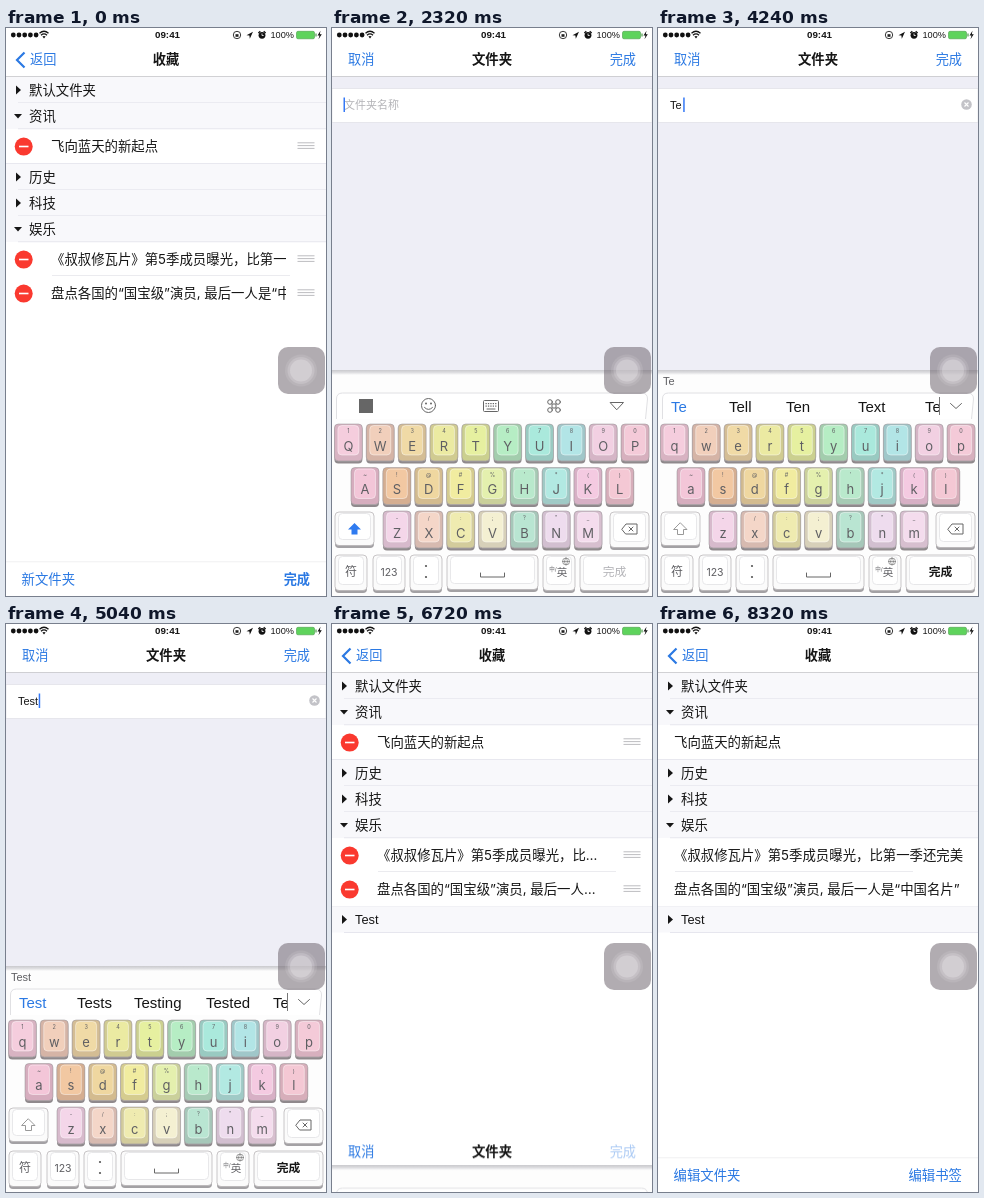
Recreate the animation shown at these times as an HTML page. Size 320x568 px, loop 8.4 s.

```html
<!DOCTYPE html>
<html lang="zh-CN">
<head>
<meta charset="utf-8">
<title>收藏</title>
<style>
html, body { margin: 0; width: 100%; height: 100%; overflow: hidden; background: #fff; }
svg { display: block; width: 320px; height: 568px; overflow: hidden; }
text { font-family: Inter, "Noto Sans CJK SC", "Noto Sans CJK", sans-serif; fill: #161616; white-space: pre; text-spacing-trim: space-all; }
.latin { font-family: "Liberation Sans", "Noto Sans CJK SC", "Noto Sans CJK", sans-serif; }
.mid { text-anchor: middle; }
.end { text-anchor: end; }
.bold { font-weight: 600; }
.blue { fill: #2b79e3; }
.grey { fill: #5f5f63; }
.pale { fill: #b4b4b8; }
.line { fill: none; stroke: #666; stroke-width: 1; stroke-linecap: round; stroke-linejoin: round; }
.modal, .keyboard, .slide, .delete, .grip { animation: 8.4s cubic-bezier(.33, 1, .68, 1) infinite; }
.modal { animation-name: modal; }
.keyboard { animation-name: keyboard; }
.slide { animation-name: slide; }
.delete { animation-name: delete; }
.grip { animation-name: grip; }
@keyframes modal {
  0%, 10.476% { transform: translateY(568px); }
  17.22%, 77.143% { transform: translateY(0); }
  82.857%, 100% { transform: translateY(568px); }
}
@keyframes keyboard {
  0%, 10.476% { transform: translateY(228px); }
  15.238%, 77.143% { transform: translateY(0); }
  82.857%, 100% { transform: translateY(228px); }
}
@keyframes slide {
  0%, 92.381% { transform: translateX(29px); }
  96.19%, 100% { transform: translateX(0); }
}
@keyframes delete {
  0%, 92.381% { transform: translateX(0); opacity: 1; }
  96.19%, 100% { transform: translateX(-29px); opacity: 0; }
}
@keyframes grip {
  0%, 92.381% { opacity: 1; }
  96.19%, 100% { opacity: 0; }
}
</style>
</head>
<body>
<svg id="stage" viewBox="0 0 320 568"></svg>
<script>
const LOOP = 8400;
// Moments of the story, in ms
const QWERTY = 2000, TYPE = 3600, COMMIT = 5600, TAP = 6320, LEAVE_EDIT = 7760;

const text = (x, y, str, size = 13.4, cls = '') =>
  `<text x="${x}" y="${(y + size * .37).toFixed(2)}" font-size="${size}" class="${cls}">${str}</text>`;
const rect = (x, y, w, h, fill, r = 0, more = '') =>
  `<rect x="${x}" y="${y}" width="${w}" height="${h}" rx="${r}" fill="${fill}" ${more}/>`;
const circle = (x, y, r, fill) => `<circle cx="${x}" cy="${y}" r="${r}" fill="${fill}"/>`;
const path = (d, more = 'class="line"') => `<path d="${d}" ${more}/>`;
const during = (from, to, content) => `<g data-show="${from} ${to}">${content}</g>`;

/* Bookmark list */
function folder(y, name, open) {
  const arrow = open ? `M8 ${y - 2}h8l-4 4.5z` : `M10 ${y - 4.5}l5 4.5-5 4.5z`;
  return rect(0, y - 13, 320, 26, '#f8f8fb') + rect(12, y + 12.5, 308, .7, '#dfdfe8') +
    path(arrow, 'fill="#161616"') + text(23, y, name, name === 'Test' ? 12.8 : 13.4, name === 'Test' ? 'latin' : '');
}

function item(y, full, short) {
  const moving = str => `<g class="slide">${text(16, y, str)}</g>`;
  const label = short
    ? during(0, 80, `<g clip-path="url(#narrow)">${moving(full)}</g>`) +
      during(80, LEAVE_EDIT, moving(short)) +
      during(LEAVE_EDIT, LOOP, `<g clip-path="url(#wide)">${moving(full)}</g>`)
    : moving(full);
  const bars = [-2.8, 0, 2.8].map(d => rect(291.5, y + d - .9, 17, 1, '#bdbdc0')).join('');
  return label +
    `<g class="delete">${circle(17.7, y + .6, 9, '#fa392f')}${rect(13, y - .3, 9.5, 1.6, '#fff')}</g>` +
    `<g class="grip">${bars}</g>`;
}

const list = rect(0, 0, 320, 568, '#fff') +
  path('M18.5 24.5l-7.5 7.5 7.5 7.5', 'fill="none" stroke="#2b79e3" stroke-width="2.2"') +
  text(24, 31.5, '返回', 13.2, 'blue') + text(160, 31.5, '收藏', 13.2, 'mid bold') +
  rect(0, 48, 320, .8, '#c6c6ca') +
  folder(62, '默认文件夹') + folder(88, '资讯', true) +
  item(118, '飞向蓝天的新起点') + rect(0, 135.2, 320, .7, '#dfdfe8') +
  folder(149, '历史') + folder(175, '科技') + folder(201, '娱乐', true) +
  item(231, '《叔叔修瓦片》第5季成员曝光，比第一季还完美', '《叔叔修瓦片》第5季成员曝光，比…') +
  `<g class="slide">${rect(17, 247.3, 238, .7, '#e2e2e8')}</g>` +
  item(265, '盘点各国的“国宝级”演员, 最后一人是“中国名片”', '盘点各国的“国宝级”演员, 最后一人…') +
  during(TAP, LOOP, rect(0, 282, 320, .7, '#e2e2e8') + folder(295.5, 'Test')) +
  rect(0, 533.5, 320, .7, '#e9e9ec') +
  during(0, LEAVE_EDIT, text(15.5, 551, '新文件夹', 13.4, 'blue') + text(304, 551, '完成', 13.2, 'blue end bold')) +
  during(LEAVE_EDIT, LOOP, text(15.5, 551, '编辑文件夹', 13.4, 'blue') + text(304, 551, '编辑书签', 13.4, 'blue end'));

/* Folder form */
const cursor = x => rect(x, 69.5, 1.5, 14.5, '#3478f6');
const phases = [
  { from: TYPE, typed: 'T', at: 19.3, words: ['T', 'The', 'This', 'That', 'To'] },
  { from: 4000, typed: 'Te', at: 25.2, words: ['Te', 'Tell', 'Ten', 'Text', 'Team'] },
  { from: 4320, typed: 'Tes', at: 30, words: ['Tes', 'Test', 'Tests', 'Testing', 'Tested'] },
  { from: 4640, typed: 'Test', at: 32.7, words: ['Test', 'Tests', 'Testing', 'Tested', 'Tester'] },
  { from: COMMIT, typed: 'Test', at: 35.3, words: ['of', 'for', 'and', 'the', 'your', 'it', 'is'], done: true }
];
phases.forEach((p, i) => p.to = i + 1 < phases.length ? phases[i + 1].from : LOOP);

const done = cls => text(304, 31.5, '完成', 13.2, 'end ' + cls);
const form = rect(0, 0, 320, 568, '#eeeef6') + rect(0, 0, 320, 48.5, '#fff') +
  rect(0, 48, 320, .8, '#c6c6ca') +
  text(16, 31.5, '取消', 13.2, 'blue') + text(160, 31.5, '文件夹', 13.4, 'mid bold') +
  during(0, TAP, done('blue')) +
  during(TAP, LOOP, `<g opacity=".4">${done('blue')}</g>`) +
  rect(0, 60.5, 320, 34, '#fff', 0, 'stroke="#dcdce3" stroke-width=".6"') +
  during(0, TYPE, text(12, 77, '文件夹名称', 11, 'pale') + cursor(11.5)) +
  during(TYPE, LOOP, circle(308.5, 76.5, 5.3, '#c3c3c8') +
    path('M306.5 74.5l4 4m0-4l-4 4', 'stroke="#fff" stroke-width="1.1"')) +
  phases.map(p => during(p.from, p.to, text(12, 77, p.typed, 11, 'latin') + cursor(p.at))).join('');

/* Keyboard */
function key(x, y, w, h, tint = '#fff') {
  const plain = tint === '#fff';
  return rect(x, y + 2, w, h - 1, plain ? '#a3a1a4' : '#8f898c', 4) +
    rect(x, y, w, h - 1.5, tint, 4, 'stroke="#b3afb2" stroke-width=".7"') +
    rect(x, y, w, h - 1.5, `rgba(70,50,60,${plain ? .02 : .17})`, 4) +
    rect(x + 3.5, y + 1.5, w - 7, h - 9, tint, 4, `stroke="${plain ? '#e3e3e5' : 'rgba(255,255,255,.55)'}" stroke-width=".8"`);
}
const spaceKey = (x, y, w) => key(x, y, w, 36) + path(`M${x + w / 2 - 12} 545v4h24v-4`);
const backspace = (x, y) => path(`M${x - 8} ${y}l4-5h11v10h-11zM${x - 1} ${y - 2}l4 4m0-4l-4 4`);
const globe = (x, y) => path(`M${x - 3.5} ${y}a3.5 3.5 0 1 0 7 0a3.5 3.5 0 1 0-7 0h7M${x} ${y - 3.5}q-3 3.5 0 7q3-3.5 0-7`,
  'class="line" style="stroke-width:.6"');

function ninePad() {
  const tints = ['#f4c6dc', '#f5edca', '#e7e7dc', '#f4c8df', '#f7edd0', '#e4e6e4', '#f6e6c7', '#f2eed1', '#d2e6de'];
  const names = ['@/.', 'ABC', 'DEF', 'GHI', 'JKL', 'MNO', 'PQRS', 'TUV', 'WXYZ'];
  const rows = [397, 441, 485];
  let out = [',', '.', '。', '?'].map((s, i) =>
    key(3, 397 + 33 * i, 48, 27) + text(24, 410 + 33 * i, s, 12, 'mid grey')).join('');
  names.forEach((name, i) => {
    const x = 57 + 71 * (i % 3), y = rows[i / 3 | 0];
    out += key(x, y, 65, 38, tints[i]) + text(x + 32.5, y + 10, i + 1, 6.5, 'mid grey') +
      text(x + 32.5, y + 22, name, 11.3, 'mid grey');
  });
  rows.forEach(y => out += key(270, y, 47, 38));
  out += backspace(294, 415) + text(293.5, 460, '换行', 11.5, 'mid grey') + text(293.5, 503, '0', 15, 'mid grey bold');
  [[3, 36], [45, 35], [86, 36], [215, 35], [256, 61]].forEach(([x, w]) => out += key(x, 528, w, 35));
  return out + spaceKey(128, 528, 81) + text(21, 545.5, '符', 12, 'mid grey') +
    path('M60.5 541a2 2 0 0 1 4 0v4a2 2 0 0 1-4 0zM58.5 544.5q0 5 4 5t4-5M62.5 549.5v2.5') +
    text(104, 545.5, '123', 11.5, 'mid grey') + text(228, 545.5, '中', 11, 'mid grey') +
    text(233.5, 549, '/英', 6, 'grey') + globe(240, 535) + text(286, 545.5, '完成', 11.8, 'mid pale');
}

const rows = [
  { y: 396, x: 16.4, keys: 'QWERTYUIOP', marks: '1234567890',
    tints: ['#f5cddd', '#f1cfbb', '#f0daa6', '#ebeaa2', '#e6f0a0', '#b6edc4', '#aae9dc', '#b2e5e6', '#f2d0e2', '#f4cad8'] },
  { y: 439.5, x: 33, keys: 'ASDFGHJKL', marks: '~!@#%\'*()',
    tints: ['#f3c6d8', '#f2c8a2', '#efd7a0', '#f1eca0', '#e4f0ae', '#b9e9cc', '#b2e9e2', '#f4cae1', '#f4c8d4'] },
  { y: 483, x: 65, keys: 'ZXCVBNM', marks: '-/:;?"_',
    tints: ['#f4d6e9', '#f4d6c8', '#efebb0', '#f4f0d2', '#b9e5d2', '#eedcee', '#f4dced'] }
];
const eachKey = draw => rows.map(r => [...r.keys].map((k, i) => draw(r, k, r.x + 31.85 * i, i)).join('')).join('');

function fullPad() {
  const shift = 'M22.5 495l6.5 6.5h-3.5v5h-6v-5h-3.5z';
  const letters = fix => eachKey((r, k, x) => text(x, r.y + 22, fix(k), 13, 'mid grey'));
  let out = eachKey((r, k, x, i) => key(x - 14, r.y, 28, 38.5, r.tints[i]) +
    text(x, r.y + 7, r.marks[i], 5.5, 'mid grey'));
  out += key(3, 484, 39, 35) + key(278, 484, 39, 37) + backspace(298, 501);
  [[3, 32], [41, 32], [78, 32], [211, 32], [248, 69]].forEach(([x, w]) => out += key(x, 527, w, 37));
  return out + spaceKey(115, 527, 91) + text(19, 544, '符', 12, 'mid grey') + text(57, 544, '123', 10.5, 'mid grey') +
    circle(94, 538, 1.1, '#555') + circle(94, 549, 1.1, '#555') +
    text(221, 541, '中/', 5.5, 'mid grey') + text(230, 544.5, '英', 10.5, 'mid grey') + globe(234, 533.5) +
    during(0, TYPE, letters(k => k) + path(shift, 'fill="#2f7bf0"') + text(282.5, 544, '完成', 11.8, 'mid pale')) +
    during(TYPE, LOOP, letters(k => k.toLowerCase()) + path(shift, 'class="line" style="stroke:#999"') +
      text(282.5, 544, '完成', 11.8, 'mid bold'));
}

function toolbar() {
  const dots = [0, 1, 2, 3, 4].map(i => rect(153.5 + i * 2.4, 375, 1.3, 1.2, '#666') + rect(153.5 + i * 2.4, 377.5, 1.3, 1.2, '#666')).join('');
  const loops = [[-1, -1], [1, -1], [-1, 1], [1, 1]].map(([a, b]) =>
    `<circle cx="${222 + a * 4}" cy="${378 + b * 4}" r="2.3" class="line"/>`).join('');
  return rect(27, 371, 14, 14, '#666') +
    '<circle cx="96.5" cy="377.5" r="7" class="line"/>' + circle(94, 375.5, 1, '#666') + circle(99, 375.5, 1, '#666') +
    path('M92.5 379.5q4 4 8 0') +
    rect(151.5, 372.5, 15, 11, 'none', 1, 'stroke="#666"') + dots + path('M155 381h8') +
    loops + rect(220, 376, 4, 4, 'none', 0, 'stroke="#666"') + path('M278.5 374.5h13l-6.5 7z');
}

function candidates(p) {
  const xs = p.done ? [12, 55, 95, 143, 186, 238, 268] : [13, 71, 128, 200, 267];
  const words = p.words.map((w, i) => text(xs[i], 378, w, 15, !p.done && i === 0 ? 'latin blue' : 'latin')).join('');
  const button = p.done
    ? '<circle cx="298" cy="378" r="6.5" class="line" style="stroke:#222"/>' + path('M295.5 375.5l5 5m0-5l-5 5', 'class="line" style="stroke:#222"')
    : path('M292.5 375.5l5.5 5 5.5-5');
  return `<g clip-path="url(#words)">${words}</g>` + rect(281, 369, 1, 18, '#777') + button +
    (p.done ? '' : text(5, 352.5, p.typed, 11, 'latin grey'));
}

const keyboard = rect(0, 342, 320, 226, '#fdfdfd') + rect(0, 342, 320, 5, 'url(#edge)') +
  path('M4.5 391v-20q0-6 6-6h299q6 0 6 6l-2 20', 'fill="#fff" stroke="#d9d9dc" stroke-width=".8"') +
  during(0, TYPE, toolbar()) + phases.map(p => during(p.from, p.to, candidates(p))).join('') +
  during(0, QWERTY, ninePad()) + during(QWERTY, LOOP, fullPad());

/* Always on top */
const statusBar = [0, 1, 2, 3, 4].map(i => circle(7.3 + i * 5.7, 7, 2.4, '#111')).join('') +
  path('M33.5 5.2q4.5-4 9 0M35 7.2q3-2.6 6 0', 'fill="none" stroke="#111" stroke-width="1.3"') +
  path('M36.4 8.6q1.6-1.2 3.2 0l-1.6 1.9z', 'fill="#111"') +
  text(161.5, 6.7, '09:41', 9.8, 'latin mid bold') +
  '<circle cx="231" cy="7" r="3.7" fill="none" stroke="#222" stroke-width=".9"/>' + rect(229.5, 6.2, 3, 2.6, '#222') +
  path('M240.5 7.3l6.5-3.5-3.2 7-.4-3.2z', 'fill="#111"') +
  circle(256, 7.3, 3.4, '#111') + path('M252.3 5l2-1.8m5.4 1.8l-2-1.8', 'stroke="#111" stroke-width="1.2"') +
  path('M256 5.5v2h1.7', 'fill="none" stroke="#fff" stroke-width=".8"') +
  text(264.5, 7, '100%', 9.2, 'latin') + rect(290.5, 3.3, 18, 7.5, '#5ed35c', 1.5, 'stroke="#4b9c4a" stroke-width=".6"') +
  rect(309.4, 5.5, 1.2, 3, '#4b9c4a') + path('M314.5 2.8l-3 4.7h2l-1 3.7 3.3-4.9h-2z', 'fill="#111"');

const assist = rect(272, 319, 47, 47, 'rgba(112,102,112,.54)', 10) +
  [16, 13.5, 11].map((r, i) => circle(295, 342.5, r, `rgba(255,255,255,${.1 + i * .06})`)).join('');

const clip = (id, x, w) => `<clipPath id="${id}">${rect(x, 0, w, 568, '#000')}</clipPath>`;
document.getElementById('stage').innerHTML =
  `<defs>${clip('narrow', 0, 280)}${clip('wide', 0, 307)}${clip('words', 0, 281)}
   <linearGradient id="edge" x2="0" y2="1"><stop stop-color="#c9c9cd"/><stop offset=".5" stop-color="#dedee1"/><stop offset="1" stop-color="#fdfdfd"/></linearGradient></defs>` +
  list + `<g class="modal">${form}</g><g class="keyboard">${keyboard}</g>` + statusBar + assist;

// Hard on and off switches
document.querySelectorAll('[data-show]').forEach(node => {
  const [from, to] = node.dataset.show.split(' ').map(ms => ms / LOOP);
  const before = from > 0 ? [[0, 0], [0, from]] : [];
  const after = to < 1 ? [[0, to], [0, 1]] : [];
  const frames = [...before, [1, from], [1, to], ...after];
  node.animate(frames.map(([opacity, offset]) => ({ opacity, offset })), { duration: LOOP, iterations: Infinity });
});
</script>
</body>
</html>
```
